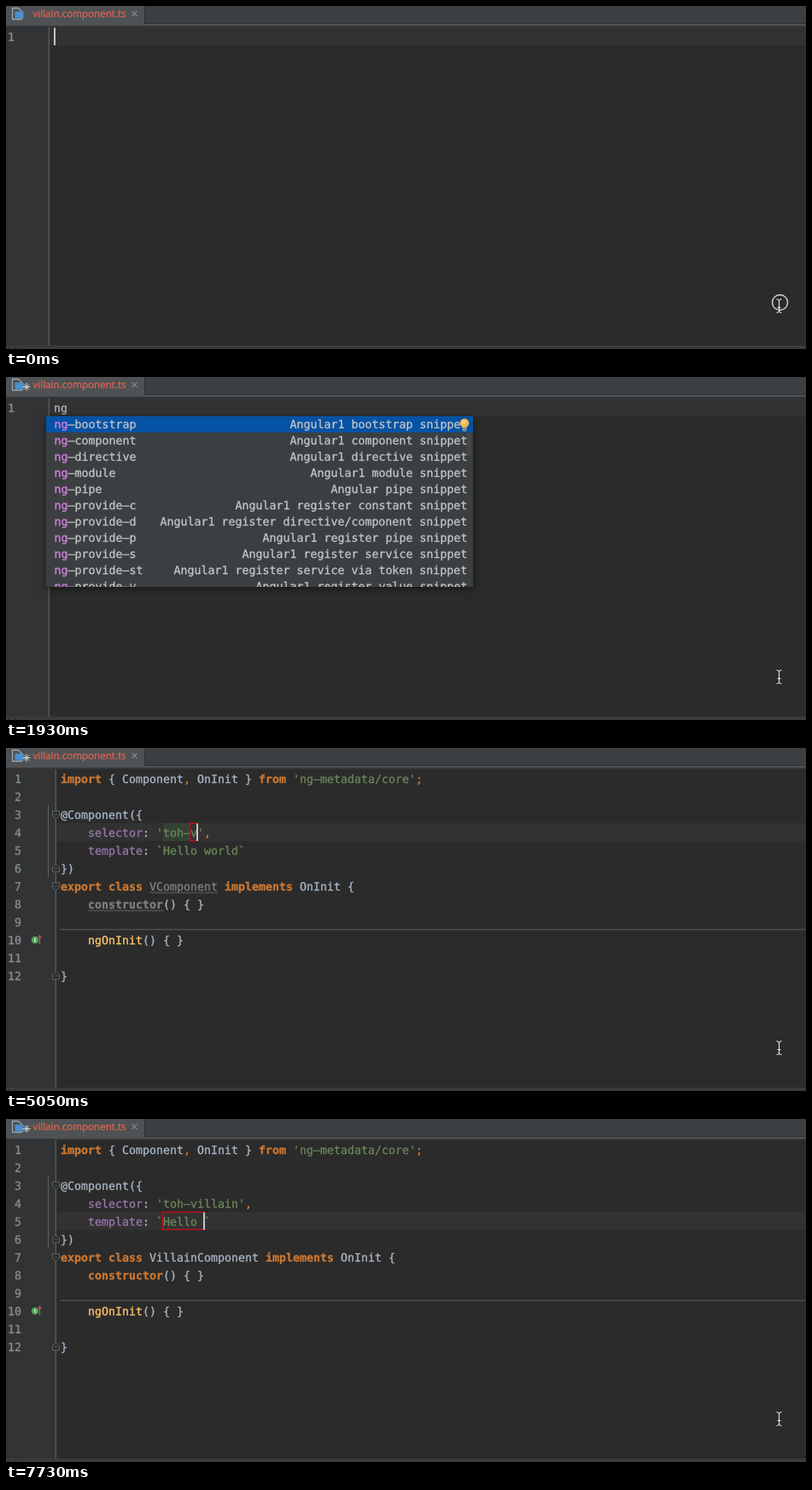
Write an HTML page with a canvas that moves like this. It is 937 px wide and 402 px high and loops after 8000 ms.

```html
<!DOCTYPE html>
<html lang="en">
<head>
<meta charset="utf-8">
<title>Editor snippet</title>
<style>
html, body { margin: 0; width: 100%; height: 100%; overflow: hidden; background: #2b2b2b; }
canvas { display: block; width: 937px; height: 402px; }
</style>
</head>
<body>
<canvas id="stage" width="937" height="402"></canvas>
<script>
const ctx = document.getElementById('stage').getContext('2d');
const LOOP = 8000, W = 937, CH = 8, ROW = 21, TOP = 25, LEFT = 64;
const MONO = '13.29px "DejaVu Sans Mono", monospace';
const SANS = '11.6px "Open Sans", sans-serif';
const TINY = '9px "DejaVu Sans", sans-serif';
ctx.textRendering = 'geometricPrecision';

// style key: [colour, bold]
const STYLES = {
  t: ['#a9b7c6'], k: ['#cc7832', true], o: ['#cc7832'], s: ['#6a8759'],
  p: ['#9876aa'], f: ['#ffc66d'], u: ['#808080'], U: ['#808080', true],
  n: ['#8b8e90'], b: ['#b4b6b7', true], m: ['#aa62b3', true], g: ['#969899'],
  w: ['#c3c5c6'], h: ['#d681de']
};

const SUGGESTIONS = [
  ['ng', ' (index.d.ts, typings/main/ambient/angular)', '', 'file'],
  ['offscreenBuffering', ' (Angular1-scaffold node_modules)', '', 'v'],
  ['onplaying', '([Event] ev)', 'any', 'v'],
  ['onseeking', '([Event] ev)', 'any', 'v'],
  ['onwaiting', '([Event] ev)', 'any', 'v'],
  ['pending', '([string, optional] reason) (index.d.ts, ty', 'void', 'λ'],
  ['toString', '() (Angular1-scaffold node_modules)', 'string', 'λ'],
  ['_ChainSingle', '', 'Angular1-scaffold node_modules', 'I'],
  ['angular', ' (index.d.ts, typings/main/ambient/angular-mocks', '', 'folder'],
  ['length', ' (Angular1-scaffold node_modules)', 'number', 'v'],
  ['onchange', '([Event] ev)', 'any', 'v']
];

const SNIPPETS = [
  ['bootstrap', 'Angular1 bootstrap'], ['component', 'Angular1 component'],
  ['directive', 'Angular1 directive'], ['module', 'Angular1 module'],
  ['pipe', 'Angular pipe'], ['provide-c', 'Angular1 register constant'],
  ['provide-d', 'Angular1 register directive/component'],
  ['provide-p', 'Angular1 register pipe'], ['provide-s', 'Angular1 register service'],
  ['provide-st', 'Angular1 register service via token'],
  ['provide-v', 'Angular1 register value']
];

function rect(x, y, w, h, color) {
  ctx.fillStyle = color;
  ctx.fillRect(x, y, w, h);
}

function disc(x, y, r, color) {
  ctx.fillStyle = color;
  ctx.beginPath();
  ctx.arc(x, y, r, 0, Math.PI * 2);
  ctx.fill();
}

function path(color, width, points, close) {
  ctx.strokeStyle = color;
  ctx.lineWidth = width;
  ctx.beginPath();
  points.forEach(([x, y]) => ctx.lineTo(x, y));
  if (close) ctx.closePath();
  ctx.stroke();
}

// A hairline stroke gives the text its slightly heavy screen weight.
function label(str, x, y, color, font, align = 'left') {
  ctx.font = font;
  ctx.fillStyle = ctx.strokeStyle = color;
  ctx.textAlign = align;
  ctx.lineWidth = 0.3;
  ctx.lineJoin = 'round';
  ctx.fillText(str, x, y);
  ctx.strokeText(str, x, y);
}

// Draws alternating style keys and strings on the fixed-width grid.
function run(x, y, ...parts) {
  for (let i = 0; i < parts.length; i += 2) {
    const [color, bold] = STYLES[parts[i]], str = parts[i + 1];
    label(str.replace(/-/g, '–'), x, y, color, (bold ? 'bold ' : '') + MONO);
    x += CH * str.length;
  }
}

function runRight(x, y, style, str) {
  run(x - CH * str.length, y, style, str);
}

function wave(x, y, w) {
  const points = [];
  for (let i = 0; i <= w; i += 2) points.push([x + i, y + (i % 4 ? 0 : 2)]);
  path('#7a7a7a', 0.8, points);
}

const rowTop = n => TOP + ROW * (n - 1);
const base = n => rowTop(n) + 16;
const between = (t, a, b) => t >= a && t < b;

function caret(x, n) {
  rect(x - 1, rowTop(n) + 0.5, 2, ROW - 0.5, '#c4c4c4');
}

function fileIcon(x, y) {
  path('#9aa7b0', 1.3, [[x, y], [x + 7, y], [x + 11, y + 4], [x + 11, y + 13], [x, y + 13]], true);
  rect(x + 3, y + 4, 10, 8, '#4a8fd0');
}

function frameBase(t, gutter) {
  rect(0, 0, W, 402, '#2b2b2b');
  rect(0, TOP, gutter, 373, '#313335');
  rect(gutter, TOP, 1.5, 373, '#555759');
  rect(0, 0, W, 21, '#3c3f41');
  rect(0, 20, W, 1, '#2f3133');
  rect(0, 21, W, 2.5, '#4f5355');
  rect(0, 0, 162, 23, '#4e5254');
  rect(162, 0, 1, 21, '#2f3133');
  rect(0, 23.5, W, 1.5, '#323436');
  rect(0, 398, W, 4, '#393b3d');
  path('#222', 1, [[4, 400], [3, 402]]);
  path('#222', 1, [[11, 400], [12, 402]]);

  fileIcon(7.5, 2.5);
  label('villain.component.ts', 31.5, 13, '#dc6350', SANS);
  path('#85888a', 1.1, [[147.5, 6], [153.5, 12]]);
  path('#85888a', 1.1, [[153.5, 6], [147.5, 12]]);
  if (t >= 300) {
    for (let i = 0; i < 4; i++) {
      const a = i * Math.PI / 4, c = Math.cos(a) * 4.5, s = Math.sin(a) * 4.5;
      path('#d8d8d8', 1, [[24 - c, 11.5 - s], [24 + c, 11.5 + s]]);
    }
  }
}

function pointer(ring) {
  const beam = [[902.5, 343.5], [904.5, 344], [905.5, 345.5], [905.5, 357.5], [904.5, 359], [902.5, 359.5]];
  const mirror = beam.map(([x, y]) => [1811 - x, y]);
  for (const [color, width] of [['#222', 2.4], ['#e8e8e8', 1.1]]) {
    path(color, width, beam);
    path(color, width, mirror);
    path(color, width, [[903.5, 353.5], [907.5, 353.5]]);
  }
  if (ring) {
    ctx.beginPath();
    ctx.arc(906.5, 347.5, 9, 0, Math.PI * 2);
    ctx.strokeStyle = '#e4e4e4';
    ctx.lineWidth = 1.3;
    ctx.stroke();
  }
}

function popupBox(h) {
  ctx.save();
  ctx.shadowColor = 'rgba(0,0,0,.5)';
  ctx.shadowBlur = 9;
  ctx.shadowOffsetY = 2;
  rect(47, 46, 500, h, '#3c3f41');
  ctx.restore();
}

function clipRows(draw) {
  ctx.save();
  ctx.beginPath();
  ctx.rect(47, 46, 500, 200);
  ctx.clip();
  draw();
  ctx.restore();
}

function kindIcon(kind, y) {
  if (kind === 'file') return fileIcon(51.5, y - 6.5);
  if (kind === 'folder') {
    path('#a88858', 1.5, [[51, y - 4], [55, y - 4], [57, y - 2], [63, y - 2], [63, y + 5], [51, y + 5]], true);
    rect(54, y, 4, 3, '#a88858');
    return;
  }
  const color = { v: '#b08d5c', 'λ': '#c46a6c', I: '#5a9f60' }[kind];
  disc(57, y, 6.7, color);
  label(kind, 57, y + 3.3, '#33302c', TINY, 'center');
  if (kind === 'I') return;
  ctx.strokeStyle = '#57a05b';
  ctx.lineWidth = 1.2;
  ctx.strokeRect(70.5, y, 6, 4.5);
  rect(72.8, y + 1.5, 1.4, 2, '#57a05b');
  ctx.beginPath();
  ctx.arc(71, y - 2, 2, Math.PI, 0);
  ctx.lineTo(73, y);
  ctx.stroke();
}

function suggestions(t) {
  popupBox(215);
  clipRows(() => {
    rect(47, 46, 500, 19, '#4a4d4f');
    SUGGESTIONS.forEach(([name, tail, right, kind], i) => {
      const y = 55 + 19 * i, at = name.indexOf('ng');
      kindIcon(kind, y);
      run(99.5, y + 5, 'b', name.slice(0, at), 'm', 'ng', 'b', name.slice(at + 2), 'g', tail);
      runRight(540.5, y + 5, 'g', right);
    });
    if (t < 740) {
      rect(518, 46.5, 15.5, 15.5, '#d2d2d2');
      ctx.beginPath();
      ctx.arc(527, 55, 3, Math.PI, t < 600 ? 4.7 : 6);
      ctx.strokeStyle = '#f4f4f4';
      ctx.lineWidth = 1.3;
      ctx.stroke();
    }
    ctx.fillStyle = '#5d6062';
    ctx.beginPath();
    ctx.roundRect(539, 48, 6, 26, 3);
    ctx.fill();
  });
  label('Press ^. to choose the selected (or first) suggestion and insert a dot afterwards',
    48, 257, '#d5d6d6', SANS);
  label('>>', 479, 257, '#5a9ae0', SANS);
  rect(479, 258, 17, 1, '#5a9ae0');
  label('π', 537, 257.5, '#4a90d0', MONO);
}

function snippets(t) {
  const chosen = t >= 2070 ? 1 : 0;
  popupBox(200);
  clipRows(() => {
    rect(47, 46 + 19 * chosen, 500, 19, '#0652a5');
    rect(540, 66, 5, 26, '#45484a');
    SNIPPETS.forEach(([name, about], i) => {
      const y = 60 + 19 * i;
      run(56.5, y, 'h', 'ng', 'w', '-' + name);
      runRight(540.5, y, 'w', about + ' snippet');
    });
    if (between(t, 1780, 2070)) {
      disc(537, 54, 5.3, '#f0b64e');
      disc(536, 53, 2.5, '#f8cf7c');
      rect(534.5, 59, 5, 4.5, '#8d8f91');
    }
  });
}

function emptyFile(t) {
  frameBase(t, 49.5);
  rect(51, TOP, W - 51, ROW, '#323232');
  run(2, base(1), 'n', '1');
  const word = 'ng'.slice(0, t < 300 ? 0 : t < 450 ? 1 : 2);
  run(56, base(1), 't', word);
  if (t < 1930) caret(57 + CH * word.length, 1);
  if (between(t, 450, 1040)) suggestions(t);
  if (t >= 1190) snippets(t);
}

function foldMark(n, down) {
  const y = rowTop(n) + 11, d = down ? 1 : -1;
  const shape = [[54.5, y - 4 * d], [62.5, y - 4 * d], [62.5, y + d], [58.5, y + 5 * d], [54.5, y + d]];
  ctx.fillStyle = '#2b2b2b';
  ctx.beginPath();
  shape.forEach(([x, py]) => ctx.lineTo(x, py));
  ctx.fill();
  path('#606264', 1, shape, true);
  path('#606264', 1, [[56.5, y], [60.5, y]]);
}

function overrideMark() {
  disc(34, 225, 4.3, '#4fa35a');
  rect(33.3, 222.8, 1.4, 4.5, '#e2eee2');
  path('#c75450', 1.2, [[39.5, 230], [39.5, 220]]);
  path('#c75450', 1.2, [[37.3, 222.5], [39.5, 219.7], [41.7, 222.5]]);
}

// Fills the selection at once and returns the outline, drawn after the text.
function field(x, n, len, selected, lit) {
  if (selected) rect(x, rowTop(n), len * CH, ROW, '#1d4489');
  return () => {
    ctx.strokeStyle = '#b9141c';
    ctx.lineWidth = 1.4;
    ctx.strokeRect(x - 0.5, rowTop(n) + 0.2, len * CH + 1, ROW - 0.7);
    if (lit) caret(x + len * CH, n);
  };
}

function codeFile(t) {
  const coloured = t >= 2670, checked = t >= 2820;
  const unused = between(t, 2820, 6540), inTemplate = t >= 6090;
  const typed = (word, start) => word.slice(0, Math.floor((t - start) / 148) + 1);
  const prefix = t < 3710 ? 'my' : typed('toh', 3710);
  const step = Math.floor((t - 5050) / 150);
  const name = 'villain'.slice(0, step < 0 ? 0 : step < 4 ? step + 1 : step + 2);
  const greeting = t < 6990 ? 'Hello world' : typed('Hello ', 6990);
  const cls = (name ? name[0].toUpperCase() + name.slice(1) : 'ComponentName') + 'Component';
  const line = (n, ...parts) => run(LEFT, base(n), ...parts);
  const lit = !between(t, 2820, 3260) && !between(t, 6540, 6990);
  const x0 = LEFT + 15 * CH, dash = x0 + (prefix.length + 1) * CH;

  frameBase(t, 57.5);
  rect(59, rowTop(inTemplate ? 5 : 4), W - 59, ROW, '#323232');
  for (let n = 1; n <= 12; n++) runRight(18, base(n), 'n', String(n));

  let outline = null;
  if (unused) {
    const full = prefix.length + 1 + name.length;
    rect(x0, rowTop(4), full * CH, ROW, '#364135');
  }
  if (inTemplate) outline = field(x0, 5, greeting.length, t < 6990, lit);
  else if (t >= 4300) {
    rect(dash, rowTop(4), name.length * CH, ROW, '#323232');
    outline = field(dash, 4, name.length, false, lit);
  } else if (t >= 2370) {
    rect(x0, rowTop(4), prefix.length * CH, ROW, '#323232');
    outline = field(x0, 4, prefix.length, t < 3710, lit);
  }

  const key = coloured ? 'p' : 't';
  line(1, 'k', 'import', 't', ' { Component', 'o', ',', 't', ' OnInit } ', 'k', 'from',
    's', " 'ng-metadata/core'", 'o', ';');
  line(3, 't', '@Component({');
  line(4, key, '    selector', 't', ': ', 's', `'${prefix}-${name}'`, 'o', ',');
  line(5, key, '    template', 't', ': ', 's', '`' + greeting + '`');
  line(6, 't', '})');
  line(7, 'k', 'export class ', unused ? 'u' : 't', cls, 'k', ' implements', 't', ' OnInit {');
  line(8, unused ? 'U' : checked ? 'k' : 't', '    constructor', 't', '() { }');
  line(10, coloured ? 'f' : 't', '    ngOnInit', 't', '() { }');
  line(12, 't', '}');

  if (unused) {
    wave(LEFT + 13 * CH, 168.5, cls.length * CH);
    wave(LEFT + 4 * CH, 189.5, 11 * CH);
  }
  if (coloured) {
    foldMark(3, true);
    foldMark(6, false);
    foldMark(7, true);
    foldMark(12, false);
  }
  if (checked) {
    rect(LEFT, 212, W - LEFT, 1.4, '#4d4f51');
    overrideMark();
  }
  if (t >= 4750) rect(49, 67, 1, 84, '#5f665f');
  if (outline) outline();
}

function draw(now) {
  const t = now % LOOP;
  (t < 2220 ? emptyFile : codeFile)(t);
  pointer(t < 150);
}

let start = null;
function tick(now) {
  if (start === null) start = now;
  draw(now - start);
  requestAnimationFrame(tick);
}
draw(0);
requestAnimationFrame(tick);
</script>
</body>
</html>
```
